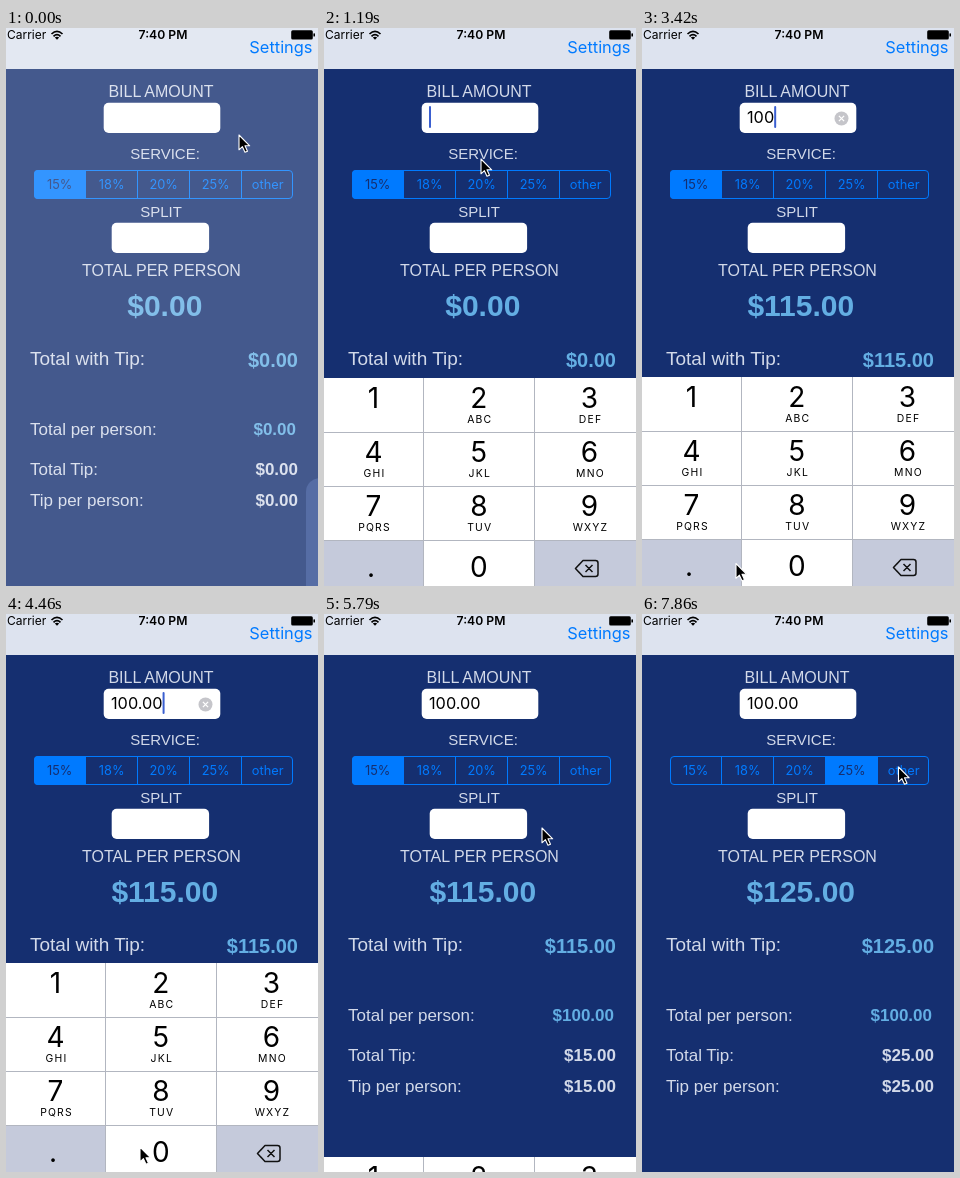
An HTML page that plays this animation: 312x558 px, repeating every 8000 ms.

```html
<!DOCTYPE html>
<html lang="en">
<head>
<meta charset="utf-8">
<title>Tip calculator</title>
<style>
  html, body { margin: 0; width: 100%; height: 100%; overflow: hidden; background: #152f70; }
  svg { display: block; width: 312px; height: 558px; }
  text { font-family: "Liberation Sans", Arial, sans-serif; fill: #d2d9e9; }
  .ui { font-family: Inter, Roboto, sans-serif; }
  .bold { font-weight: 700; }
  .accent { fill: #63aee3; }
  .mid { text-anchor: middle; }
  .end { text-anchor: end; }
</style>
</head>
<body>
<svg id="stage" viewBox="0 0 312 558"></svg>
<script>
const LOOP = 8000, STEP = 148.4;
const NAVY = '#152f70', BLUE = '#007aff', KEY_GREY = '#c5cadb';
const stage = document.getElementById('stage');

function add(tag, attrs, parent = stage, content) {
  const el = document.createElementNS('http://www.w3.org/2000/svg', tag);
  for (const name in attrs) el.setAttribute(name, attrs[name]);
  if (content !== undefined) el.textContent = content;
  parent.appendChild(el);
  return el;
}
const rect = (x, y, width, height, fill, rx = 0, parent = stage) =>
  add('rect', { x, y, width, height, fill, rx }, parent);
const label = (x, y, size, content, cls = '', parent = stage, fill) =>
  add('text', { x, y, 'font-size': size, class: cls, ...(fill && { style: `fill:${fill}` }) }, parent, content);
const show = (el, opacity) => el.setAttribute('opacity', opacity);

// Page
rect(0, 0, 312, 558, NAVY);
label(155, 69, 16, 'BILL AMOUNT', 'mid');
label(159, 130.5, 15, 'SERVICE:', 'mid');
label(155, 188.5, 15, 'SPLIT', 'mid');
label(155.5, 248, 16, 'TOTAL PER PERSON', 'mid');
label(24, 337.4, 19, 'Total with Tip:');
label(24, 406.6, 17, 'Total per person:');
label(24, 446.6, 17, 'Total Tip:');
label(24, 477.6, 17, 'Tip per person:');
const totals = [
  label(158.8, 288, 30, '', 'bold accent mid'),
  label(292, 338.5, 20, '', 'bold accent end')
];
const perPerson = label(290, 406.6, 17, '', 'bold accent end');
const tips = [446.6, 477.6].map(y => label(292, y, 17, '', 'bold end'));

// Input fields
rect(97.7, 74.8, 116.6, 30.2, '#fff', 5);
rect(105.7, 194.8, 97.4, 30.2, '#fff', 5);
const billText = label(105, 95, 16.3, '', 'ui', stage, '#000');
const caret = rect(105, 78, 2, 22, '#3a5fd0', 1);
const clearIcon = add('g', { transform: 'translate(199.5 90.5)' });
add('circle', { r: 7, fill: '#c5c5ca' }, clearIcon);
add('path', { d: 'M-2.6-2.6 2.6 2.6M2.6-2.6-2.6 2.6', stroke: '#fff', 'stroke-width': 1.3 }, clearIcon);

// Service selector
const SEG_W = 52;
const clip = add('clipPath', { id: 'segClip' }, add('defs', {}));
rect(28, 142, 259, 29, '#000', 4, clip);
const fills = add('g', { 'clip-path': 'url(#segClip)' });
const segments = ['15%', '18%', '20%', '25%', 'other'].map((name, i) => {
  const x = 28 + i * SEG_W, cx = x + 25.7;
  const fill = rect(x, 142, SEG_W, 29, BLUE, 0, fills);
  if (i) rect(x - 1, 142, 1, 29, BLUE);
  const off = label(cx, 161, 12.8, name, 'ui mid', stage, BLUE);
  const on = label(cx, 161, 12.8, name, 'ui mid', stage, NAVY);
  return { fill, off, on };
});
add('rect', { x: 28.5, y: 142.5, width: 258, height: 28, rx: 3.5, fill: 'none', stroke: BLUE });

// Keyboard, laid out from its own top edge
const keyboard = add('g', {});
const COLS = [0, 99, 210, 312], ROW_H = 54;
const LETTERS = ['', 'ABC', 'DEF', 'GHI', 'JKL', 'MNO', 'PQRS', 'TUV', 'WXYZ'];
const keys = {};
['1', '2', '3', '4', '5', '6', '7', '8', '9', '.', '0', 'del'].forEach((name, i) => {
  const col = i % 3, y = Math.floor(i / 3) * ROW_H, cx = [49.5, 154.8, 265.5][col];
  const base = name === '.' || name === 'del' ? KEY_GREY : '#fff';
  const cell = rect(COLS[col], y, COLS[col + 1] - COLS[col], ROW_H + 1, base, 0, keyboard);
  keys[name] = { cell, base };
  if (name === 'del') return;
  label(name === '.' ? 47 : cx, y + (i > 8 ? 36.5 : 29.8), 28, name, 'ui mid', keyboard, '#000');
  if (LETTERS[i]) {
    const caption = label(cx + 1, y + 45, 10.4, LETTERS[i], 'ui mid', keyboard, '#000');
    caption.setAttribute('letter-spacing', 1.2);
  }
});
for (let r = 1; r < 4; r++) rect(0, r * ROW_H, 312, 1, '#b2b6c0', 0, keyboard);
for (const x of COLS.slice(1, 3)) rect(x, 0, 1, 220, '#b2b6c0', 0, keyboard);
add('path', {
  d: 'M259 182.5H271.5Q274 182.5 274 185V196Q274 198.5 271.5 198.5H259L251.5 190.5ZM261.5 187 268.5 194M268.5 187 261.5 194',
  fill: 'none', stroke: '#111', 'stroke-width': 1.5, 'stroke-linejoin': 'round'
}, keyboard);

// Launch screen fading away
const veil = add('g', {});
rect(0, 41, 312, 517, 'rgba(255,255,255,.2)', 0, veil);
rect(300, 450, 40, 140, '#566da5', 14, veil);

// Navigation and status bar
const navBar = rect(0, 0, 312, 41, '#dde3ef');
label(306.5, 25, 16.4, 'Settings', 'ui end', stage, BLUE);
label(1, 10.8, 12, 'Carrier', 'ui', stage, '#000');
const clock = label(157, 10.8, 12.2, '7:40 PM', 'ui mid', stage, '#000');
clock.setAttribute('font-weight', 600);
const wifi = add('g', { fill: 'none', stroke: '#000', 'stroke-width': 1.7 });
add('path', { d: 'M45.5 6Q51 .8 56.5 6M47.5 8.3Q51 5 54.5 8.3' }, wifi);
add('path', { d: 'M51 11.8 48.8 9.5Q51 7.8 53.2 9.5Z', fill: '#000', stroke: 'none' }, wifi);
rect(285.2, 2.3, 21.6, 9.2, '#000', 1.5);
rect(307.4, 5.2, 1.6, 3.4, '#000', 0.7);

const cursor = add('path', {
  d: 'M0 0V14.8L3.4 11.7 6 17.3 8.5 16.2 6 10.8H10.7Z',
  fill: '#000', stroke: '#fff', 'stroke-width': 1.1, 'stroke-linejoin': 'round'
});

// Timeline; the screen refreshes once per step
const CURSOR = [ // step, x, y
  [0, 233, 107], [1, 248, 102], [2, 200, 94], [3, 157, 88], [6, 157, 88], [7, 157, 98],
  [8, 157, 131], [10, 105, 270], [12, 50, 368], [14, 49, 372], [16, 84.5, 527], [17, 138, 536],
  [22, 138, 536], [24, 50, 535], [25, 50, 535], [27, 134, 533], [30, 134, 533], [31, 275, 306],
  [33, 275, 306], [35, 272, 303], [36, 272, 303], [39, 218, 214], [43, 103, 157], [46, 106, 157],
  [48, 154, 157], [51, 209, 156], [53, 256.5, 153]
];
const BILL = [[0, ''], [14, '1'], [19, '10'], [22, '100'], [25, '100.'], [28, '100.0'], [30, '100.00']];
const PRESSES = { 13: '1', 18: '0', 21: '0', 24: '.', 27: '0', 29: '0' };
const RATES = [[0, 0], [6670, 1], [7110, 2], [7600, 3]]; // time, segment
const TIP = [0.15, 0.18, 0.20, 0.25];
const FADE = 250;

const clamp = v => Math.max(0, Math.min(1, v));
const latest = (list, at) => list.filter(item => item[0] <= at).pop();
const money = v => '$' + v.toFixed(2);
const spring = ms => {
  const w = Math.max(0, ms) * 0.024;
  return 1 - (1 + w) * Math.exp(-w);
};

function cursorAt(step) {
  const i = Math.max(1, CURSOR.findIndex(p => p[0] >= step));
  const [s0, x0, y0] = CURSOR[i - 1], [s1, x1, y1] = CURSOR[i];
  const k = clamp((step - s0) / (s1 - s0));
  return [x0 + (x1 - x0) * k, y0 + (y1 - y0) * k];
}

function caretOpacity(step) {
  if (step < 6 || step > 37) return 0;
  if (step >= 10 && step <= 12) return step === 11 ? 0 : 0.4;
  if (step >= 33 && step <= 35) return step === 34 ? 0 : 0.4;
  return 1;
}

function render(time) {
  const step = Math.min(53, Math.floor((time + 6) / STEP));
  const now = step * STEP + 2;

  show(veil, step ? 0 : 1);
  navBar.setAttribute('fill', step ? '#dde3ef' : '#e3e8f2');

  const bill = latest(BILL, step)[1];
  billText.textContent = bill;
  caret.setAttribute('x', 105 + (bill ? billText.getComputedTextLength() : 0));
  show(caret, caretOpacity(step));
  show(clearIcon, bill && step < 38 ? 1 : 0);

  const selected = latest(RATES, now)[1];
  const amount = Number(bill), tip = amount * TIP[selected];
  totals.forEach(el => el.textContent = money(amount + tip));
  perPerson.textContent = money(amount);
  tips.forEach(el => el.textContent = money(tip));

  segments.forEach(({ fill, off, on }, i) => {
    const start = i ? (RATES[i] ? RATES[i][0] : Infinity) : -FADE;
    const stop = RATES[i + 1] ? RATES[i + 1][0] : Infinity;
    const level = clamp((now - start) / FADE) * (1 - clamp((now - stop) / FADE));
    show(fill, level);
    show(on, level);
    show(off, 1 - level);
  });

  const lift = spring(now - 880) - spring(now - 5629);
  const top = Math.round(349 + 216 * (1 - lift));
  keyboard.setAttribute('transform', `translate(0 ${top})`);
  for (const name in keys) {
    const { cell, base } = keys[name];
    const pressed = PRESSES[step] === name;
    cell.setAttribute('fill', pressed ? (base === '#fff' ? KEY_GREY : '#fff') : base);
  }

  cursor.setAttribute('transform', `translate(${cursorAt(step)})`);
}

const began = performance.now();
function tick() {
  render((performance.now() - began) % LOOP);
  requestAnimationFrame(tick);
}
tick();
</script>
</body>
</html>
```
